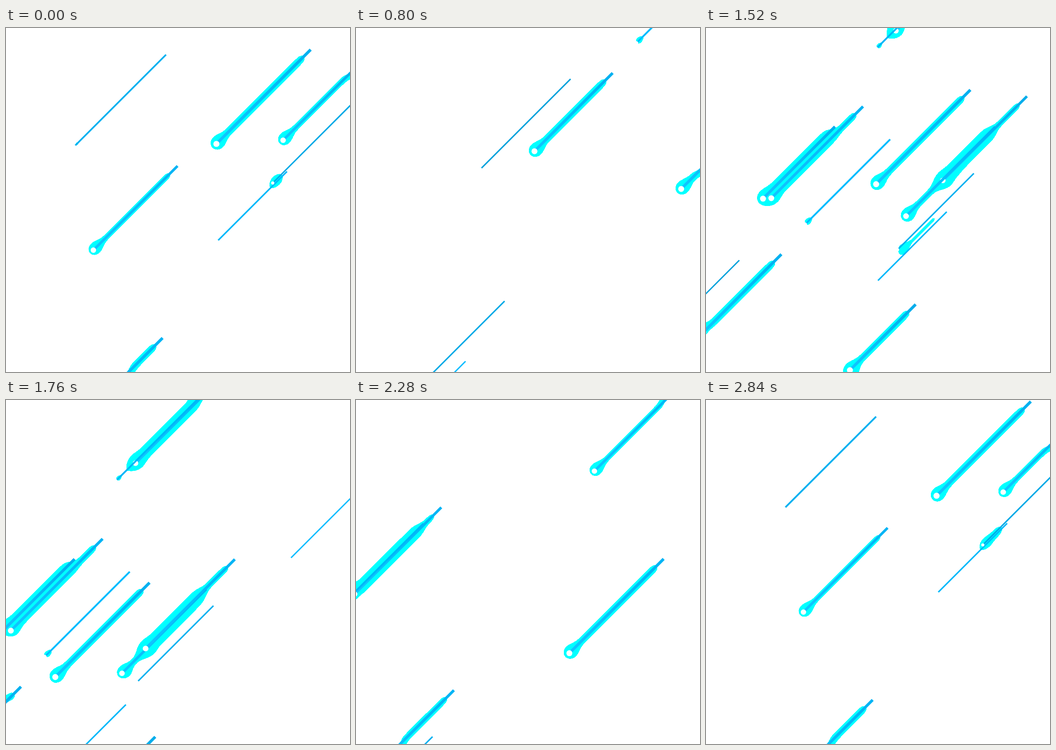
These frames come from a looping animation (748 by 748 pixels, 2.88 s). An HTML page with a canvas:

```html
<!DOCTYPE html>
<html lang="en">
<head>
<meta charset="utf-8">
<title>Meteor shower</title>
<style>
  html, body { margin: 0; width: 100%; height: 100%; overflow: hidden; background: #fff; }
  canvas { position: absolute; left: 0; top: 0; width: 748px; height: 748px; }
  #glow { filter: url(#hard); }
  svg { position: absolute; }
</style>
</head>
<body>
<svg width="0" height="0">
  <filter id="hard" x="0" y="0" width="1" height="1" color-interpolation-filters="sRGB">
    <feComponentTransfer><feFuncA type="discrete" tableValues="0 1"/></feComponentTransfer>
  </filter>
</svg>
<canvas id="glow" width="748" height="748"></canvas>
<canvas id="lines" width="748" height="748"></canvas>
<script>
const SIZE = 748, FRAME = 40, FRAMES = 72, TRAVEL = 1576.5, TOP = -500;
const FAR = 3000;  // shadows are cast from shapes drawn this far off stage
const TIP_GAP = 8; // the glow stops short of the tail tip

const lerp = ([a, b], f) => a + (b - a) * f;

// Each swarm varies evenly from its first meteor to its last;
// heads are the places of the heads at time 0, passes the crossings per loop.
const swarms = [
  { passes: 2, len: [205, 183], width: [6.3, 5.7], light: [47, 46],
    heads: [[457.5, 252], [602.5, 244]] },
  { passes: 2, len: [152, 146], width: [3.2, 2.9], light: [49, 50],
    heads: [[459, 464], [968, -5]] },
  { passes: 1, len: [205, 183], width: [6.2, 5.6], light: [48, 48],
    heads: [[135.5, 879], [974, -462], [1267, -423], [1245, -826], [190, 483]] },
  { passes: 1, len: [170, 143], width: [6.2, 6.2], light: [47, 46],
    heads: [[826, -170], [956, -461], [1145, -88]] },
  { passes: 1, len: [200, 185], width: [3.7, 4], light: [47, 50],
    heads: [[148, 258], [1202, -787], [1047.5, -405]] },
  { passes: 1, len: [196, 166], width: [3, 3.2], light: [43, 47],
    heads: [[708.5, -131], [580, 337], [1248.5, -350]] }
];

const meteors = swarms.flatMap(({ passes, len, width, light, heads }) =>
  heads.map(([x, y], i) => {
    const f = i / (heads.length - 1);
    return { x, y, passes, len: lerp(len, f), width: lerp(width, f), light: lerp(light, f) };
  }));

const glow = document.getElementById('glow').getContext('2d');
const lines = document.getElementById('lines').getContext('2d');

function castShadow(density, peak, blur) {
  const alpha = Math.min(1, (1 - Math.exp(-density)) / peak);
  glow.shadowColor = `rgba(0,255,255,${alpha})`;
  glow.shadowBlur = blur * 2;
  glow.shadowOffsetX = FAR;
}

function glowStroke(x1, y1, x2, y2, width) {
  castShadow(0.137 * width, 0.83, 10.2);
  glow.lineWidth = 28;
  glow.beginPath();
  glow.moveTo(x1 - FAR, y1);
  glow.lineTo(x2 - FAR, y2);
  glow.stroke();
}

function glowDot(x, y, r) {
  castShadow(0.023 * r * r, 0.84, 9.4);
  glow.beginPath();
  glow.arc(x - FAR, y, 18, 0, Math.PI * 2);
  glow.fill();
}

// The blur repeats the border pixels, so the glow flares where a shape meets an edge.
function flare(x, y, dx, dy, width) {
  glowStroke(x, y, x + dx * 50, y + dy * 50, width);
}

function flareHead(x, y, r) {
  const edge = (dist, ex, ey, dx, dy) => {
    if (Math.abs(dist) < r) flare(ex, ey, dx, dy, 2 * Math.sqrt(r * r - dist * dist));
  };
  edge(x, 0, y, -1, 0);
  edge(SIZE - x, SIZE, y, 1, 0);
  edge(y, x, 0, 0, -1);
  edge(SIZE - y, x, SIZE, 0, 1);
}

function drawGlow(x, y, { len, width }, r) {
  const from = Math.max(0, -x, y - SIZE);
  const to = Math.min(len - TIP_GAP, SIZE - x, y);
  if (x > -r && x < SIZE + r && y > -r && y < SIZE + r) flareHead(x, y, r);
  if (to <= from) return;
  glowStroke(x + from, y - from, x + to, y - to, width);
  if (from > 0) {
    const left = -x >= y - SIZE;
    flare(x + from, y - from, left ? -1 : 0, left ? 0 : 1, width * 1.4);
  } else {
    glowDot(x, y, r);
  }
  if (to < len - TIP_GAP) {
    const right = SIZE - x <= y;
    flare(x + to, y - to, right ? 1 : 0, right ? 0 : -1, width * 1.4);
  }
}

function drawLine(x, y, { len, width, light }, r) {
  const color = lines.createLinearGradient(x, y, x + len, y - len);
  const tip = `hsl(196,100%,${light}%)`;
  color.addColorStop(0, width > 5 ? '#12c4ff' : tip);
  color.addColorStop(1, tip);
  lines.strokeStyle = color;
  lines.lineWidth = width;
  lines.beginPath();
  lines.moveTo(x, y);
  lines.lineTo(x + len, y - len);
  lines.stroke();
  lines.fillStyle = '#fff';
  lines.beginPath();
  lines.arc(x, y, r, 0, Math.PI * 2);
  lines.fill();
}

function draw(frame) {
  glow.clearRect(0, 0, SIZE, SIZE);
  lines.clearRect(0, 0, SIZE, SIZE);
  for (const m of meteors) {
    const moved = m.y - TOP + TRAVEL * m.passes * frame / FRAMES;
    const y = TOP + (moved % TRAVEL + TRAVEL) % TRAVEL;
    const x = m.x + m.y - y, r = m.width + 0.3;
    drawGlow(x, y, m, r);
    drawLine(x, y, m, r);
  }
}

const start = performance.now();
let shown = -1;
function tick() {
  const frame = Math.floor((performance.now() - start) / FRAME) % FRAMES;
  if (frame !== shown) draw(shown = frame);
  requestAnimationFrame(tick);
}
tick();
</script>
</body>
</html>
```
